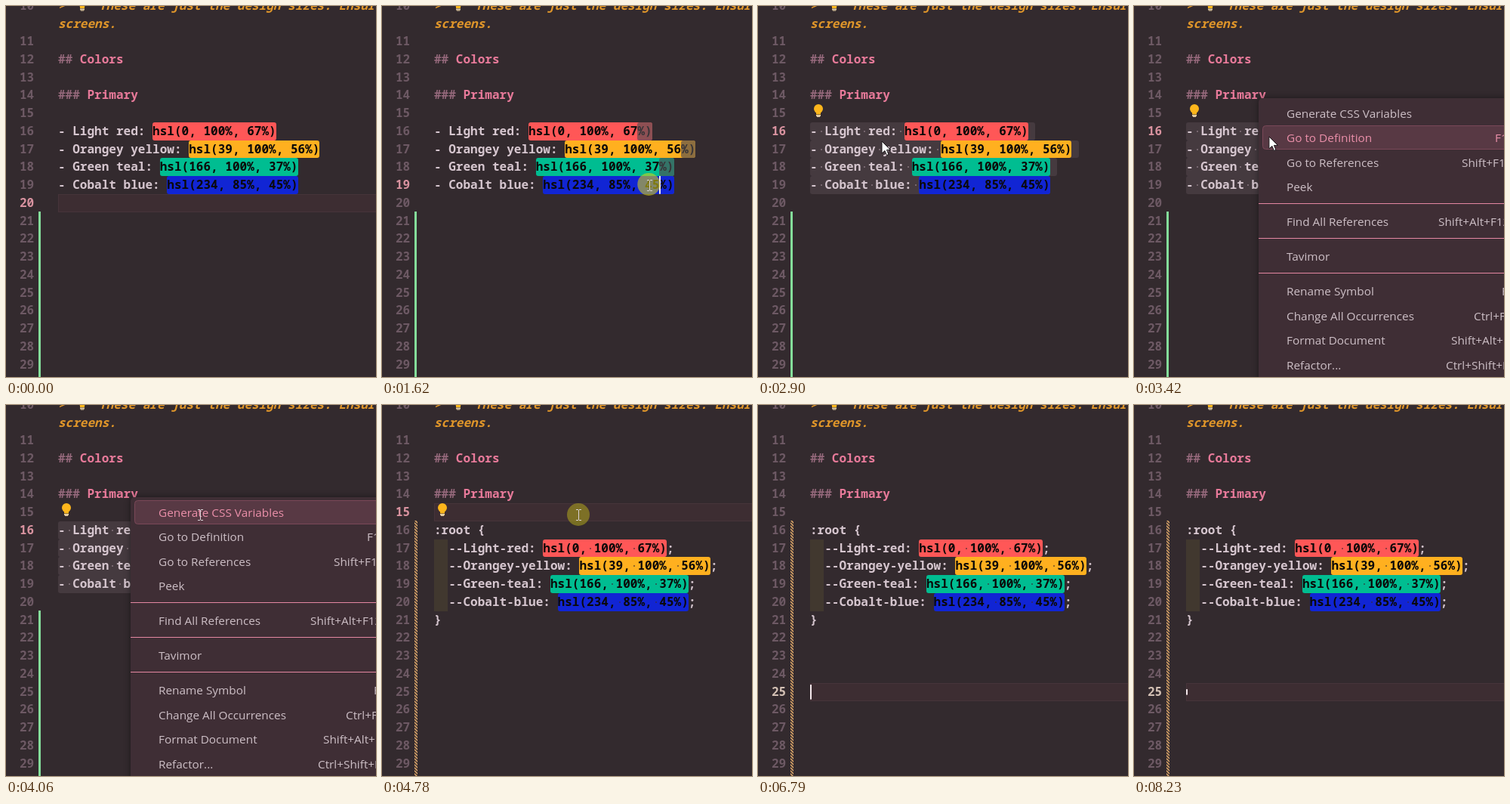
An HTML page with a canvas for the animation above (8.33 s loop, 490 by 491 pixels).

```html
<!DOCTYPE html>
<html lang="en">
<head>
<meta charset="utf-8">
<title>Colour list to CSS variables</title>
<style>
html, body { margin: 0; width: 100%; height: 100%; overflow: hidden; background: #332a2e; }
canvas { display: block; }
</style>
</head>
<body>
<canvas id="stage" width="490" height="491"></canvas>
<script>
const ctx = document.getElementById("stage").getContext("2d");
const W = 490, H = 491, LOOP = 8330;
const CELL = 9.624, ROW = 23.75, LEFT = 69;
const MONO = '16.04px "Noto Sans Mono", "DejaVu Sans Mono", monospace';
const UI = '15.35px "Open Sans", "Noto Sans", sans-serif';

const BG = "#332a2e", TEXT = "#d6c6cf", DIM = "#6d5964", PINK = "#e87a9a";
const ORANGE = "#e0962a", ACTIVE = "#d8929f", SELECT = "#53434a", SELECT_IDLE = "#453a3f";

// Moments of the story, in ms
const PRESS = 1500, RELEASE = 2240, BULB_ON = 2510, MENU_ON = 2930, MENU_OFF = 4090;
const EDIT = 4260, CHIPS_ON = 4290, CLICK_A = 4590, BULB_OFF = 5160, CLICK_B = 6120;

const SWATCHES = [
  ["Light red", "hsl(0, 100%, 67%)"],
  ["Orangey yellow", "hsl(39, 100%, 56%)"],
  ["Green teal", "hsl(166, 100%, 37%)"],
  ["Cobalt blue", "hsl(234, 85%, 45%)"]
];

// Each line: row, text before the colour, colour, text after it
const LIST = SWATCHES.map(([name, color], i) => [16 + i, `- ${name}: `, color, ""]);
const RULE = [
  [16, ":root {", "", ""],
  ...SWATCHES.map(([name, color], i) => [17 + i, `  --${name.replace(" ", "-")}: `, color, ";"]),
  [21, "}", "", ""]
];

const MENU = [
  ["Generate CSS Variables", 148],
  ["Go to Definition", 180, "F12", 478],
  ["Go to References", 213, "Shift+F12", 434],
  ["Peek", 245],
  ["Find All References", 291, "Shift+Alt+F12", 403],
  ["Tavimor", 337],
  ["Rename Symbol", 383, "F2", 487],
  ["Change All Occurrences", 416, "Ctrl+F2", 450],
  ["Format Document", 448, "Shift+Alt+F", 420],
  ["Refactor...", 481, "Ctrl+Shift+R", 413]
];

// Pointer stops: time, x, y
const DRAG = [[1500, 405, 240], [1590, 370, 238], [1620, 355, 237], [1800, 232, 224],
  [1950, 146, 194], [1980, 139, 191], [2100, 100, 177], [2220, 74, 170]];
const PATHS = [
  [200, [[200, 488, 482]], 230],
  [990, [[990, 485, 256], [1170, 405, 240]], PRESS],
  [PRESS, DRAG, 2380],
  [2380, [[2380, 74, 170], [2600, 128, 172], [2880, 164, 179]], 3360],
  [3360, [[3360, 164, 179], [3450, 186, 170], [3600, 257, 145]], CLICK_A],
  [CLICK_A, [[CLICK_A, 260, 145]], 5740],
  [5740, [[5740, 260, 145], [5860, 240, 220], [6080, 191, 384], [6220, 190, 386], [6340, 184, 399]], 6370],
  [6370, [[6370, 232, 420], [6400, 364, 458]], 6430]
];

const clamp = (v, a = 0, b = 1) => Math.min(b, Math.max(a, v));
const smooth = p => p * p * (3 - 2 * p);
const rowTop = row => Math.round(35.1 + (row - 11) * ROW);
const colX = col => LEFT + col * CELL;
const size = line => line[1].length + line[2].length + line[3].length;

function along(stops, t) {
  let i = 0;
  while (i < stops.length - 1 && t >= stops[i + 1][0]) i++;
  const a = stops[i], b = stops[i + 1];
  if (!b) return { x: a[1], y: a[2] };
  const p = clamp((t - a[0]) / (b[0] - a[0]));
  return { x: a[1] + (b[1] - a[1]) * p, y: a[2] + (b[2] - a[2]) * p };
}

function pointerAt(t) {
  const part = PATHS.find(([from, , to]) => t >= from && t < to);
  return part && along(part[1], t);
}

function box(x, y, w, h, r, fill, stroke) {
  ctx.beginPath();
  ctx.roundRect(x, y, w, h, r);
  ctx.fillStyle = fill;
  ctx.fill();
  if (stroke) {
    ctx.strokeStyle = stroke;
    ctx.lineWidth = 1;
    ctx.stroke();
  }
}

// Rounded background behind a run of cells, snapped to whole pixels
function cells(row, from, to, fill) {
  const x = Math.round(colX(from)), y = rowTop(row);
  box(x, y, Math.round(colX(to)) - x, rowTop(row + 1) - y, 3, fill);
}

function write(str, x, y, color, font) {
  ctx.font = font;
  ctx.fillStyle = color;
  ctx.fillText(str, x, y);
}

function code(str, row, col, color, weight = 600) {
  write(str, colX(col), rowTop(row) + 17, color, `${weight} ${MONO}`);
}

function dots(str, row, col, color) {
  ctx.fillStyle = color;
  [...str].forEach((c, i) => {
    if (c === " ") ctx.fillRect(Math.round(colX(col + i)) + 4, rowTop(row) + 11, 2, 2);
  });
}

function bulb(x, y) {
  ctx.fillStyle = "#fdb61c";
  ctx.beginPath();
  ctx.arc(x, y - 2.5, 6, 0, 7);
  ctx.fill();
  ctx.fillRect(x - 3, y + 2, 6, 3);
  ctx.fillStyle = "#e2cba2";
  ctx.fillRect(x - 3, y + 5.5, 6, 2);
  ctx.fillRect(x - 2, y + 7.5, 4, 1);
}

function bar(edited) {
  if (!edited) {
    ctx.fillStyle = "#84dd9a";
    ctx.fillRect(43, 272, 3, H);
    return;
  }
  ctx.save();
  ctx.beginPath();
  ctx.rect(43, 153, 4, H);
  ctx.clip();
  ctx.strokeStyle = "#e9b06e";
  ctx.lineWidth = 1.5;
  ctx.beginPath();
  for (let y = 152; y < H + 8; y += 4) {
    ctx.moveTo(42, y - 1);
    ctx.lineTo(48, y + 5);
  }
  ctx.stroke();
  ctx.restore();
}

function caret(row, col, scale = 1) {
  const h = ROW * scale;
  ctx.fillStyle = "#f4e8ec";
  ctx.fillRect(Math.round(colX(col)), rowTop(row) + (ROW - h) / 2, 2, h);
}

// Caret cell while dragging upwards from the end of row 19
function dragState(t) {
  const p = along(DRAG, t - 25);
  const row = t >= 2220 ? 16 : clamp(Math.floor((p.y - rowTop(16)) / ROW) + 16, 16, 19);
  const col = t >= 2220 ? 0 : clamp(Math.round((p.x - LEFT) / CELL), 0, size(LIST[row - 16]));
  return { row, col };
}

function select(lines, from, fill) {
  const last = lines[lines.length - 1][0];
  for (const line of lines) {
    const [row, before] = line;
    if (row < from.row) continue;
    const start = row === from.row ? from.col : 0;
    const end = size(line) + (row < last ? 1 : 0);
    if (end > start) cells(row, start, end, fill);
    dots(before.slice(start), row, start, "#76666e");
  }
}

function currentLine(row) {
  const y = rowTop(row);
  ctx.fillStyle = "#46343a";
  ctx.fillRect(LEFT, y, W, 24);
  ctx.fillStyle = "#3d2d32";
  ctx.fillRect(LEFT + 1, y + 1, W, 22);
}

function editor(t) {
  const edited = t >= EDIT;
  const lines = edited ? RULE : LIST;
  const chips = !edited || t >= CHIPS_ON;
  let active = { row: 20, col: 0 }, selecting = false;
  if (t >= CLICK_B) active = { row: 25, col: 0 };
  else if (t >= CLICK_A) active = { row: 15, col: 0 };
  else if (t >= PRESS) {
    active = dragState(t);
    selecting = active.row < 19 || active.col < size(LIST[3]);
  }

  if (!selecting) currentLine(active.row);
  if (edited) {
    ctx.fillStyle = "#41382f";
    ctx.fillRect(LEFT, rowTop(17), 18, rowTop(21) - rowTop(17));
  }
  if (selecting) select(lines, active, t < 2380 ? SELECT : SELECT_IDLE);

  bar(edited);
  write("10", 18, 5, DIM, `600 ${MONO}`);
  for (let n = 11; n <= 29; n++) {
    const color = n !== active.row ? DIM : n === 25 ? "#d3c0b4" : ACTIVE;
    write(String(n), 18, rowTop(n) + 17, color, `600 ${MONO}`);
  }

  const note = `italic 600 ${MONO}`;
  write(">", LEFT, 5, ORANGE, note);
  bulb(101, -2);
  write("These are just the design sizes. Ensure", 123, 5, ORANGE, note);
  write("screens.", LEFT, 29, ORANGE, note);
  code("##", 12, 0, "#96697c");
  code("Colors", 12, 3, PINK, 700);
  code("###", 14, 0, "#96697c");
  code("Primary", 14, 4, PINK, 700);

  for (const [row, before, color, after] of lines) {
    const col = before.length, end = col + color.length;
    code(before, row, 0, TEXT);
    if (color) {
      if (chips) cells(row, col, end, color);
      code(color, row, col, chips ? "#0b0909" : TEXT);
      if (edited && chips) dots(color, row, col, "rgba(60,40,50,.55)");
    }
    code(after, row, end, TEXT);
  }

  // Equal text in the other rows lights up while the selection is short
  const picked = size(LIST[3]) - active.col;
  if (selecting && active.row === 19 && picked <= 2) {
    for (const line of LIST.slice(0, 3)) {
      cells(line[0], size(line) - picked, size(line), "rgba(80,76,82,.65)");
    }
  }

  if (t >= PRESS && t < 2400) caret(active.row, active.col);
  if (t >= CLICK_B) caret(25, 0, blink(Math.min(t, 8230)));
  if (t >= BULB_ON && t < BULB_OFF) bulb(80, 138.5);
}

// Height of the resting caret: shrinks and grows in turn
function blink(t) {
  const phase = t - 6715;
  if (phase < 0) return 1;
  const p = smooth(clamp((phase % 470) / 282));
  return Math.floor(phase / 470) % 2 ? p : 1 - p;
}

function menu(pointer) {
  ctx.save();
  ctx.shadowColor = "rgba(0,0,0,.45)";
  ctx.shadowBlur = 8;
  box(165, 122, 400, 420, 5, "#3f2e35");
  ctx.restore();

  let hover = -1;
  if (pointer.x > 169) hover = pointer.y < 158 ? 0 : pointer.y < 191 ? 1 : -1;
  MENU.forEach(([label, y, keys, x], i) => {
    const on = i === hover;
    if (on) box(170.5, y - 21.5, 400, 31, 4, "#583944", "#7a4858");
    const color = on ? "#ea8fa9" : "#cdbfc6";
    write(label, 202, y, color, UI);
    if (keys) write(keys, x, y, color, UI);
  });
  ctx.fillStyle = "#e487a2";
  for (const y of [261, 307, 353]) ctx.fillRect(165, y, W, 1);
}

function ring(t, from, until, gone, at) {
  if (t < from || t >= gone) return;
  const alpha = 0.56 * (1 - clamp((t - until) / (gone - until)));
  ctx.fillStyle = `rgba(222,212,20,${alpha})`;
  ctx.beginPath();
  ctx.arc(at.x, at.y, 15, 0, 7);
  ctx.fill();
}

function arrow({ x, y }) {
  const shape = [[0, 0], [0, 16], [4, 12.5], [6.5, 18.5], [9, 17.5], [6.5, 11.5], [11.5, 11.5]];
  ctx.beginPath();
  for (const [dx, dy] of shape) ctx.lineTo(x + dx, y + dy);
  ctx.closePath();
  ctx.fillStyle = "#fff";
  ctx.fill();
  ctx.strokeStyle = "#1a1518";
  ctx.lineWidth = 1;
  ctx.stroke();
}

function beam(p) {
  const x = Math.round(p.x), y = Math.round(p.y);
  ctx.fillStyle = "#d9d3d6";
  ctx.fillRect(x, y - 6, 1, 13);
  for (const edge of [y - 7, y + 7]) {
    ctx.fillRect(x - 3, edge, 3, 1);
    ctx.fillRect(x + 1, edge, 3, 1);
  }
}

function draw(t) {
  ctx.fillStyle = BG;
  ctx.fillRect(0, 0, W, H);
  editor(t);
  const p = pointerAt(t);
  if (t >= MENU_ON && t < MENU_OFF) menu(p);
  if (!p) return;
  ring(t, PRESS, RELEASE - 90, RELEASE + 10, { x: p.x - 1, y: p.y - 1 });
  ring(t, CLICK_A, 4710, 4960, p);
  ring(t, CLICK_B, 6190, 6340, p);
  if (t >= 2380 && t < 4060) arrow(p);
  else beam(p);
}

const begin = performance.now();
function tick() {
  draw((performance.now() - begin) % LOOP);
  requestAnimationFrame(tick);
}
tick();
</script>
</body>
</html>
```
